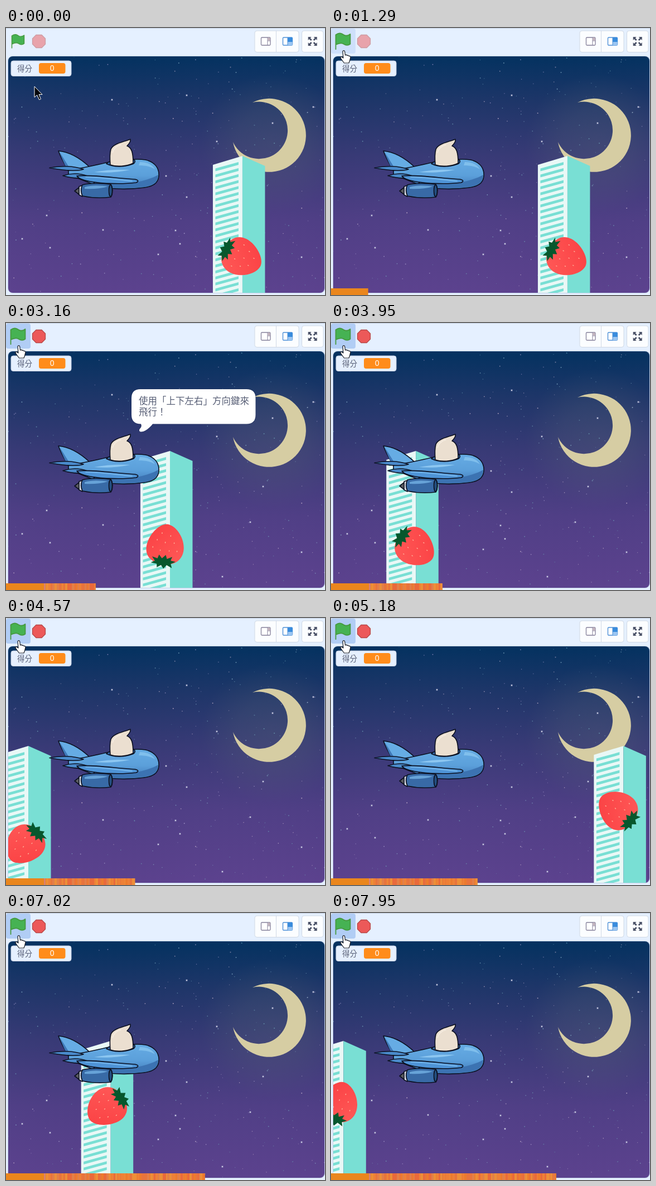
An HTML page for the animation above (8 s loop, 572x480 px).

```html
<!DOCTYPE html>
<html lang="zh-Hant">
<head>
<meta charset="utf-8">
<title>Flying game</title>
<style>
  html, body { margin: 0; width: 100%; height: 100%; overflow: hidden; background: #e5f0ff; }
  svg { display: block; width: 100vw; height: 100vh; }
  text { font-family: "Noto Sans CJK TC", "Noto Sans CJK", "Noto Sans", sans-serif; fill: #575e75; }
  .ink { stroke: #0b1020; stroke-width: 1.6; stroke-linejoin: round; stroke-linecap: round; }
</style>
</head>
<body>
<svg viewBox="0 0 572 480">
  <defs>
    <linearGradient id="sky" x1="0" y1="0" x2="0" y2="1">
      <stop offset="0" stop-color="#043260"/>
      <stop offset=".2" stop-color="#1f3669"/>
      <stop offset=".42" stop-color="#383a76"/>
      <stop offset=".7" stop-color="#503f86"/>
      <stop offset="1" stop-color="#5c428e"/>
    </linearGradient>
    <radialGradient id="glow">
      <stop offset="0" stop-color="#5f6b78" stop-opacity=".28"/>
      <stop offset=".5" stop-color="#5f6b78" stop-opacity=".2"/>
      <stop offset="1" stop-color="#5f6b78" stop-opacity="0"/>
    </radialGradient>
    <linearGradient id="red" x1="0" y1="0" x2="1" y2="1">
      <stop offset="0" stop-color="#ff5a58"/>
      <stop offset="1" stop-color="#fa3f42"/>
    </linearGradient>
    <linearGradient id="metal" x1="0" y1="0" x2="0" y2="1">
      <stop offset="0" stop-color="#66ace4"/>
      <stop offset=".55" stop-color="#5b9fda"/>
      <stop offset="1" stop-color="#3f78b8"/>
    </linearGradient>
    <clipPath id="stageClip"><rect x="4" y="51" width="567" height="425" rx="8"/></clipPath>
    <clipPath id="barClip"><rect id="barWidth" y="468" width="0" height="12"/></clipPath>
  </defs>

  <rect width="572" height="480" fill="#e5f0ff"/>
  <path d="M0 .5H572" stroke="#c3cfdf"/>

  <!-- toolbar -->
  <rect id="flagBack" y="1" width="44" height="45" rx="4" fill="#b1cdf5"/>
  <g id="flag">
    <path d="M11 14C17 10 20 12 23 14S29 16 33 13V28C29 31 26 30 23 28S17 26 11 29Z" fill="#46b253"/>
    <path d="M11 36V14C17 10 20 12 23 14S29 16 33 13V28C29 31 26 30 23 28S17 26 11 29" fill="none" stroke="#45993d" stroke-width="1.5" stroke-linecap="round" stroke-linejoin="round"/>
  </g>
  <path id="stop" d="M54 12.5H64L70.5 19V29L64 35.5H54L47.5 29V19Z" fill="#ec5959" stroke="#b84848" stroke-width="1.3"/>
  <g fill="#fbfdff" stroke="#d0d9e5">
    <rect x="446" y="5" width="79" height="38.5" rx="4"/>
    <rect x="530.5" y="5" width="38.5" height="38.5" rx="4"/>
    <path d="M484.5 5V43.5"/>
  </g>
  <rect x="457.5" y="17" width="16.5" height="14" rx="1.5" fill="#fff" stroke="#85809a" stroke-width="1.3"/>
  <path d="M469 17V31M469 23H474" stroke="#85809a"/>
  <rect x="469.5" y="17.5" width="4" height="5" fill="#c3b3bd"/>
  <rect x="496.5" y="17" width="17" height="14" rx="1.5" fill="#fff" stroke="#4d90d8" stroke-width="1.4"/>
  <path d="M505 17H513.5V25H505Z" fill="#398cdd"/>
  <path d="M505 25H513.5V31H505Z" fill="#9cc6f2"/>
  <path d="M505 17V31" stroke="#4d90d8"/>
  <g id="arrows" fill="#4c5369"></g>

  <!-- stage -->
  <rect x="3" y="50" width="569" height="427" rx="9" fill="#c5d2e8"/>
  <g clip-path="url(#stageClip)">
    <rect x="4" y="51" width="567" height="425" fill="url(#sky)"/>
    <ellipse cx="478" cy="208" rx="130" ry="125" fill="url(#glow)"/>
    <g id="stars"></g>
    <path d="M442 134A66 66 0 1 1 407 205A51.3 51.3 0 1 0 442 134Z" fill="#d6cda3"/>

    <g id="building">
      <path d="M0 246L53 230V480H0Z" fill="#e9f8f6"/>
      <path d="M53 230L93.5 248V480H53Z" fill="#79dfd4"/>
      <g id="windows" fill="#79dfd4"></g>
    </g>

    <g id="berry">
      <path d="M0-31C20-34 33.5-22 33.5-5C33.5 16 16 40 2 40C-15 40-33.5 18-33.5-3C-33.5-22-18-34 0-31Z" fill="url(#red)"/>
      <g id="seeds" fill="#ffb199"></g>
      <path d="M-2-40L3-34L10-39L11-33L22-32L15-28L21-21L11-23L9-16L3-22L-3-15L-6-22L-15-17L-13-24L-22-25L-14-30L-17-37L-7-33Z" fill="#07572d"/>
    </g>

    <g id="plane" class="ink">
      <path d="M94 221C116 223 134 235 150 250L139 262L112 257C106 246 99 235 94 221Z" fill="#66ace4"/>
      <path d="M96 223C104 235 110 246 117 256L110 255C105 245 100 235 96 223Z" fill="#3f78b8" stroke="none"/>
      <path d="M112 256C140 251 160 247 180 242C205 238 232 234 250 237C268 241 275 253 274 266C273 280 262 285 247 287C225 290 205 290 184 288C157 283 134 272 112 263Z" fill="url(#metal)"/>
      <path d="M150 277C195 284 245 280 273 264C272 280 262 284 247 286C220 289 195 289 176 286Z" fill="#3c73b2" stroke="none"/>
      <path d="M240 241C254 241 263 246 267 254C260 249 250 247 238 247Z" fill="#80bfec" stroke="none"/>
      <path d="M158 259C178 255 201 254 222 255C204 259 180 261 158 259Z" fill="#8dc7f1" stroke="none"/>
      <path d="M180 244C184 239 190 239 194 239L228 236C233 238 232 243 226 245C212 250 194 251 180 244Z" fill="#376aa6"/>
      <path d="M187 246C186 234 186 225 188 218C192 208 207 206 223 200C224 205 220 209 217 212C225 215 228 223 228 243C216 249 198 250 187 246Z" fill="#ebdfd0"/>
      <path d="M191 224C194 215 199 212 206 210" fill="none" stroke="#f7eee2"/>
      <path d="M78 251.500C98 247 122 248 139 254C126 258 108 257 78 251.500Z" fill="#4a8acb"/>
      <path d="M102 265.500C116 261 132 261 146 266C137 271 121 271 102 265.500Z" fill="#4a8acb"/>
      <path d="M157 280C159 274 165 270 174 271L186 276L184 283Z" fill="#396fad"/>
      <path d="M123 293L132 286V300Z" fill="#5b5c61"/>
      <path d="M131 285L137 283V303L131 300Z" fill="#d9dde5"/>
      <path d="M137 282C151 278 174 279 188 281C192 288 192 297 188 304C171 306 151 305 137 302C134 295 134 288 137 282Z" fill="#386aa6"/>
      <path d="M141 286C154 282 170 283 183 285C169 289 155 290 141 289Z" fill="#67a3d8" stroke="none"/>
      <ellipse cx="187.500" cy="292.500" rx="3" ry="10.500" fill="#244f80"/>
      <path d="M127 266C153 263 195 270 231 272C237 273 239 276 233 278C209 281 174 280 151 276C139 274 130 270 127 266Z" fill="#4f94d7"/>
      <path d="M143 268C170 268 198 273 226 275" fill="none" stroke="#79b9eb"/>
    </g>

    <g id="bubble">
      <path d="M241 119H431Q447.500 119 447.500 135V165Q447.500 181.500 431 181.500H263C258 188 250 195 243 195.500C238 195.500 238 192 241 189Q244 186 242 181.500Q225 181.500 225 165V135Q225 119 241 119Z" fill="#fff" stroke="#17264d" stroke-opacity=".3" stroke-width="2" paint-order="stroke"/>
      <text x="238" y="146" font-size="16.500">使用「上下左右」方向鍵來</text>
      <text x="238" y="166" font-size="16.500">飛行！</text>
    </g>

    <rect x="9" y="59" width="108" height="27.500" rx="4" fill="#e6f0ff" stroke="#c2cce0"/>
    <text x="20" y="77.500" font-size="13.500">得分</text>
    <rect x="59" y="63" width="47.500" height="19" rx="4" fill="#ff8c1a"/>
    <text x="82.700" y="76.500" font-size="14" text-anchor="middle" style="font-family:'Liberation Sans',sans-serif;fill:#fff">0</text>
  </g>

  <g id="bar" clip-path="url(#barClip)"></g>

  <path id="arrow" d="M0 0V19.500L4.700 15.500L8.500 24L11.500 22.700L8 14.500H14Z" fill="#05070c" stroke="#fff" stroke-width="1"/>
  <path id="hand" d="M-1.500 1.500C-1.500-1 2-1 2.200 1.500L3 8C4.500 6.500 6 7 6.400 8.500C8 7.500 9.500 8.500 9.700 9.700C11.500 9 12.500 10 12.500 12L11 18L9.500 22H1L-4 15C-7 11.500-5 9.500-2.500 11.500L-.5 13Z" transform="translate(22.500 41)" fill="#fff" stroke="#171b24" stroke-width="1.200" stroke-linejoin="round"/>
</svg>
<script>
const $ = id => document.getElementById(id);
const add = (parent, tag, attrs) => {
  const node = document.createElementNS("http://www.w3.org/2000/svg", tag);
  for (const name in attrs) node.setAttribute(name, attrs[name]);
  $(parent).append(node);
};
const place = (id, transform) => $(id).setAttribute("transform", transform);
const show = (id, visible) => $(id).style.display = visible ? "" : "none";

let seed = 71;
const random = () => (seed = seed * 16807 % 2147483647) / 2147483647;
const pick = list => list[Math.floor(random() * list.length)];

function buildScene() {
  for (let i = 0; i < 4; i++)
    add("arrows", "path", {
      d: "M-8-8H-2L-4-6L-1-3L-3-1L-6-4L-8-2Z",
      transform: `translate(549.7 24) rotate(${i * 90})`
    });

  for (let i = 0; i < 300; i++)
    add("stars", "circle", {
      cx: 4 + random() * 567, cy: 51 + random() * 425, r: .5 + random() * .45,
      fill: pick(["#8fb8cf", "#a99dce", "#72a6bb", "#d4bfd6"]), opacity: .35 + random() * .5
    });
  const bright = [[29,379],[273,407],[304,364],[438,358],[388,456],[73,337],[174,363],
    [287,266],[461,294],[324,304],[190,129],[324,121],[551,142],[378,204],[478,171],
    [448,247],[312,388],[79,395],[530,412]];
  for (const [cx, cy] of bright) {
    add("stars", "circle", { cx, cy, r: 2.2, fill: "#b5b6df", opacity: .3 });
    add("stars", "circle", { cx, cy, r: 1.1, fill: "#e2e4ee" });
  }

  for (let y = 252.6; y < 496; y += 10.8)
    add("windows", "path", { d: `M4.500 ${y}L46 ${y - 11.5}v5L4.500 ${y + 5}Z` });

  for (const [cx, cy] of [[-22,-6],[-8,-7],[8,-8],[22,-4],[-15,8],[1,7],[16,10],[-7,20],[9,23]])
    add("seeds", "ellipse", { cx, cy, rx: .8, ry: 1.3 });

  add("bar", "rect", { y: 468, width: 572, height: 12, fill: "#ea861d" });
  for (let x = 72; x < 410;) {
    const width = 1 + Math.floor(random() * 4);
    add("bar", "rect", {
      x, y: 468, width, height: 12,
      fill: pick(["#ee8137", "#e96a3b", "#ec7b2e", "#e37f48", "#ed8f38", "#e8743c"])
    });
    x += width;
  }
  add("bar", "rect", { x: 68, y: 468, width: 3, height: 12, fill: "#dc806e" });
}

const LOOP = 8000, TICK = 77.3;
const HOVER = 12, START = 20, HUSH = 46, WRAP = 62;

// Position in stage units, where 0 is the centre and each game step is 5.
function obstacle(tick) {
  if (tick < START) return { x: 110, y: 413, angle: -62 };
  const second = tick >= WRAP;
  const raw = second ? 195 - 11.8 * (tick - 67) : 170 - 12.05 * (tick - 27);
  const x = Math.min(250, Math.round(raw / 5) * 5);
  return { x, y: second ? 345 : 403, angle: (second ? 326 : 188) - x };
}

function draw(time) {
  const tick = Math.floor((time + 27.5) / TICK);
  const { x, y, angle } = obstacle(tick);
  const centre = 287.5 + x * 567 / 480;
  place("building", `translate(${centre - 46.5} 0)`);
  place("berry", `translate(${centre + .5} ${y}) rotate(${angle}) translate(2.5 1)`);

  const p = Math.min(1, tick / 13), ease = p * p * (3 - 2 * p);
  const hover = tick >= HOVER, running = tick >= START;
  place("arrow", `translate(${51 - 28 * ease} ${105 - 64 * ease})`);
  show("arrow", !hover);
  show("hand", hover);
  show("flagBack", hover);
  $("flagBack").style.opacity = running ? 1 : .45;
  place("flag", hover ? "translate(21.5 24) scale(1.18) translate(-22 -24)" : "translate(-.5 0)");
  $("stop").style.opacity = running ? 1 : .5;
  show("bubble", running && tick < HUSH);
  $("barWidth").setAttribute("width", tick * 3.92);
}

buildScene();
const begin = performance.now();
function animate() {
  draw((performance.now() - begin) % LOOP);
  requestAnimationFrame(animate);
}
animate();
</script>
</body>
</html>
```
